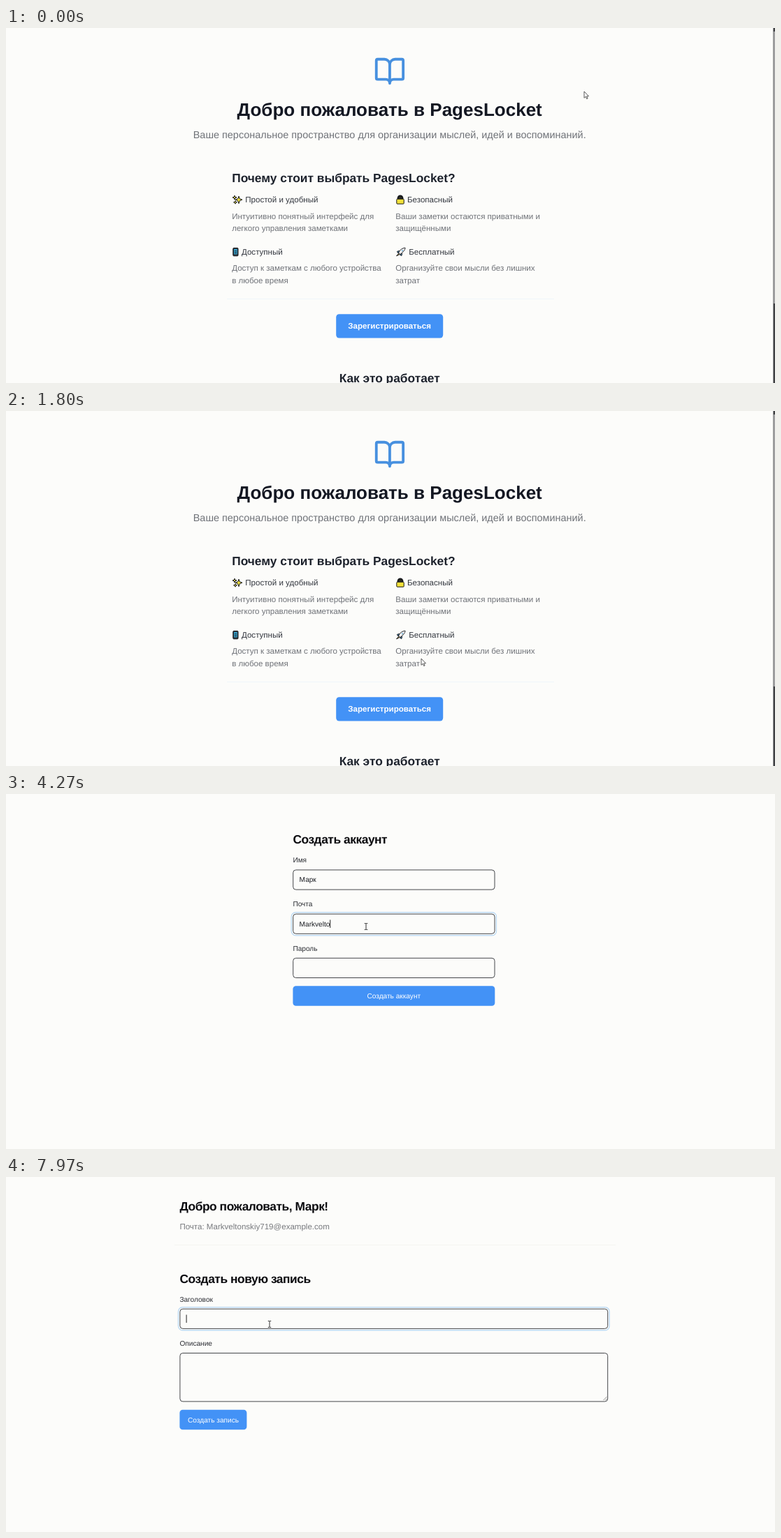
An HTML page for the animation above (8000 ms loop, 1100 by 509 pixels).

```html
<!DOCTYPE html>
<html lang="ru">
<head>
<meta charset="utf-8">
<title>PagesLocket</title>
<style>
  html, body { margin: 0; width: 100%; height: 100%; overflow: hidden; background: #fcfcfa; }
  svg { display: block; width: 1100px; height: 509px; }
  text { font-family: "Liberation Sans", Arial, sans-serif; text-rendering: geometricPrecision; white-space: pre; }
  .field { fill: #fcfcfa; stroke: #45474b; stroke-width: 1; }
  .ring { fill: none; stroke: #bcdaf3; stroke-width: 1.4; }
  .ink { stroke: #16181c; stroke-linejoin: round; }
</style>
</head>
<body>
<svg id="stage" viewBox="0 0 1100 509"></svg>
<script>
const LOOP = 8000, MAX_SCROLL = 157, MID = 548.7;
const H1 = 26.02, H2 = 17.34, LEAD = 14.45, BODY = 11.56, SMALL = 10.12;
const BLUE = '#4392f6', HOVER = '#2473f8';
const BRAND = 'PagesLocket', USER = 'Марк', MAIL = 'Markveltonskiy719@example.com';
const T_FORM = 2640, T_NOTES = 7240;

// Text placed by the middle of its capitals.
function text(x, cy, size, str, o = {}) {
  const { fill = '#6f7278', bold, anchor = 'start', track = 0, id } = o;
  return `<text ${id ? `id="${id}"` : ''} x="${x}" y="${cy + size * 0.35}" font-size="${size}" fill="${fill}"
    text-anchor="${anchor}" font-weight="${bold ? 700 : 400}" letter-spacing="${track}">${str}</text>`;
}
const mid = (x, cy, size, str, o) => text(x, cy, size, str, { ...o, anchor: 'middle' });
const title = (x, cy, str) => text(x, cy, H2, str, { bold: true, fill: '#0b0b0f', track: -0.025 * H2 });
const label = (x, cy, str) => text(x, cy, SMALL, str, { fill: '#2b2d33' });
const box = (x, y, w, h, attrs) => `<rect x="${x}" y="${y}" width="${w}" height="${h}" ${attrs}/>`;
const field = (x, y, w, h) => box(x, y, w, h, 'rx="4" class="field"');
const button = (id, x, y, w, h) => box(x, y, w, h, `id="${id}" rx="4.3" fill="${BLUE}"`);
const group = (id, body) => `<g id="${id}">${body}</g>`;
const at = (x, y, body) => `<g transform="translate(${x} ${y})">${body}</g>`;

const sparkles = `<path class="ink" fill="#f2e23c" d="M2-5 3.4-1.2 7 0 3.4 1.4 2 5.5.6 1.4-3 0 .6-1.2Z
  M-4-6-3.2-4-1-3.2-3.2-2.4-4 0-4.8-2.4-7-3.2-4.8-4Z M-3 1.5-2.3 3-.6 3.7-2.3 4.4-3 6-3.7 4.4-5.4 3.7-3.7 3Z"/>`;
const lock = `<path class="ink" fill="#2b2b22" stroke-width="2" d="M-3.4 0V-2.4a3.4 3.4 0 0 1 6.8 0V0"/>
  <rect class="ink" x="-5.2" y="-1" width="10.4" height="7" rx="1" fill="#f3e13a"/>`;
const phone = `<rect class="ink" x="-3.6" y="-5.6" width="7.2" height="11.4" rx="1" fill="#2a3036"/>
  <rect x="-2.4" y="-4" width="4.8" height="7.4" fill="#35a3cf"/><path stroke="#16181c" d="M-1.6-1.2H1.6M-1.6 1.4H1.6"/>`;
const rocket = `<path class="ink" fill="#4fa9df" d="M-2.2-1.6-5.6-.6-4 2Z M1.6 2.2.8 5.6-1.8 4Z"/>
  <path class="ink" fill="#f2f2f2" d="M6-5.8C2-5.6-1.8-2.8-3.4 1.2L-1 3.6C3-.2 6-2.4 6-5.8Z"/>
  <circle cx="2" cy="-1.8" r="1.1" fill="#7fb9dd"/><path class="ink" fill="#f0c040" d="M-3.4 2.4-6.4 5.8-2.6 4Z"/>`;

function feature(x, y, icon, iconX, titleX, head, lines) {
  return at(iconX, y, icon) + text(titleX, y, BODY, head, { fill: '#33373f' }) +
    lines.map((s, i) => text(x, y + 23.3 + i * 17.3, BODY, s)).join('');
}
function step(x, n, head, note) {
  return `<circle cx="${x}" cy="559.5" r="23.1" fill="${BLUE}"/>` +
    mid(x, 559.5, H2, n, { fill: '#fff' }) +
    mid(x, 602.8, BODY, head, { fill: '#33373f' }) + mid(x, 625.8, BODY, note);
}

const book = `<path transform="translate(525.9 39) scale(1.92)" fill="none" stroke="#4790df" stroke-width="2"
  stroke-linecap="round" stroke-linejoin="round" d="M12 7v14M3 18a1 1 0 0 1-1-1V4a1 1 0 0 1 1-1h5a4 4 0 0 1 4 4
  4 4 0 0 1 4-4h5a1 1 0 0 1 1 1v13a1 1 0 0 1-1 1h-6a3 3 0 0 0-3 3 3 3 0 0 0-3-3z"/>`;

const landing = group('content', book +
  mid(MID, 117, H1, `Добро пожаловать в ${BRAND}`, { bold: true, fill: '#131722' }) +
  mid(MID, 153, LEAD, 'Ваше персональное пространство для организации мыслей, идей и воспоминаний.') +
  text(323.2, 214.6, H2, `Почему стоит выбрать ${BRAND}?`, { bold: true, fill: '#1d222c' }) +
  feature(323.2, 246.2, sparkles, 331, 342.3, 'Простой и удобный', ['Интуитивно понятный интерфейс для', 'легкого управления заметками']) +
  feature(557.3, 246.2, lock, 564, 574, 'Безопасный', ['Ваши заметки остаются приватными и', 'защищёнными']) +
  feature(323.2, 321, phone, 328.4, 337, 'Доступный', ['Доступ к заметкам с любого устройства', 'в любое время']) +
  feature(557.3, 321, rocket, 565, 576.2, 'Бесплатный', ['Организуйте свои мысли без лишних', 'затрат']) +
  box(316, 388, 468, 1, 'fill="#eff6f9"') +
  button('signup', 472.2, 410.2, 153, 34.2) +
  mid(MID, 427.3, BODY, 'Зарегистрироваться', { bold: true, fill: '#fff' }) +
  mid(MID, 501.6, H2, 'Как это работает', { bold: true, fill: '#1d222c' }) +
  step(183, 1, 'Зарегистрируйтесь', 'Создайте бесплатный аккаунт за несколько секунд') +
  step(MID, 2, 'Создавайте заметки', 'Добавляйте свои мысли и идеи') +
  step(914.4, 3, 'Организуйте', 'Держите ваши заметки в порядке и всегда под рукой')) +
  box(1097.4, 0, 2.6, 509, 'fill="#404144"') + box(1097.4, 5, 2.6, 390, 'id="thumb" fill="#9f9fa1"');

const FIELD_Y = [108.9, 172.1, 235.3];
const form = title(410.4, 65.3, 'Создать аккаунт') +
  ['Имя', 'Почта', 'Пароль'].map((s, i) =>
    label(410.4, FIELD_Y[i] - 14.2, s) + field(410.7, FIELD_Y[i], 288.3, 28.2) +
    text(419.6, FIELD_Y[i] + 14, SMALL, '', { id: 'in' + i, fill: '#1c1e24' })).join('') +
  box(408.3, 0, 293.1, 33, 'id="ring" rx="6" class="ring"') +
  box(0, 0, 1, 11.5, 'id="caret" fill="#222"') +
  button('submit', 410.4, 275.2, 288.9, 28.6) +
  mid(554.8, 289.4, SMALL, 'Создать аккаунт', { fill: '#fff' });

const notes = title(248.4, 42.4, `Добро пожаловать, ${USER}!`) +
  text(248.4, 71.2, BODY, `Почта: ${MAIL}`, { fill: '#77797d' }) +
  box(241, 97, 631, 1, 'fill="#f4f5f1"') +
  title(248.4, 145.8, 'Создать новую запись') +
  label(248.4, 175, 'Заголовок') + field(248.9, 189.2, 611.8, 28.2) +
  `<g id="noteFocus">${box(246.5, 186.8, 616.6, 33, 'rx="6" class="ring"')}${box(257.6, 197.5, 1, 11.5, 'fill="#222"')}</g>` +
  label(248.4, 238.3, 'Описание') + field(248.9, 252.5, 611.8, 69.4) +
  '<path d="M854.5 320 859.5 315M857.3 320.3 859.8 317.8" stroke="#777" stroke-width=".8"/>' +
  button('save', 248.4, 333.8, 96, 28.4) +
  mid(296.5, 348, SMALL, 'Создать запись', { fill: '#fff' });

const cursors =
  group('arrow', '<path d="M0 0V9.3L2.2 7.3 3.7 10.6 5.1 10 3.7 6.8H6.5Z" fill="#fff" stroke="#333" stroke-width=".8" stroke-linejoin="round"/>') +
  group('beam', '<path d="M-2.2-4.5H-.6L0-4 .6-4.5H2.2M0-4V4M-2.2 4.5H-.6L0 4 .6 4.5H2.2" fill="none" stroke="#333" stroke-width="1"/>') +
  group('hand', `<path d="M-.9.8C-.9-.5.9-.5.9.8V4.2L5 5.1Q6 5.4 6 6.5L5.3 9.3V11.3H-.4V10L-3.3 6.6
    C-3.8 5.6-2.7 4.9-2 5.6L-.9 6.7Z" fill="#fff" stroke="#333" stroke-width=".8" stroke-linejoin="round"/>`);

const stage = document.getElementById('stage');
stage.innerHTML = group('landing', landing) + group('form', form) + group('notes', notes) + group('mouse', cursors);
const el = id => document.getElementById(id);
const show = (id, on) => el(id).style.display = on ? '' : 'none';
const move = (id, x, y) => el(id).setAttribute('transform', `translate(${x} ${y})`);

// Keys are [time, ...values]; each stretch eases in and out.
function sample(keys, t) {
  const i = keys.findIndex(k => k[0] > t);
  if (i < 0) return keys[keys.length - 1].slice(1);
  const a = keys[i - 1], b = keys[i], u = (t - a[0]) / (b[0] - a[0]), e = u * u * (3 - 2 * u);
  return a.slice(1).map((v, j) => v + (b[j + 1] - v) * e);
}
const SCROLL = [[0, 0], [60, 0], [660, MAX_SCROLL], [1200, MAX_SCROLL], [1740, 0]];
const MOUSE = [[0, 827, 91], [1460, 827, 91], [1800, 594, 355], [2300, 536, 424], [2660, 536, 424],
  [2950, 533, 132], [3700, 533, 132], [3900, 515, 190], [4960, 515, 190], [5230, 488, 260],
  [6420, 488, 260], [6680, 485, 290], [7260, 485, 290], [7680, 377, 211]];
// Text, focus time, first key, key interval.
const INPUTS = [[USER, 2950, 3230, 110], [MAIL, 3910, 4020, 30], ['•'.repeat(9), 5240, 5340, 105]];
const BLUR = 6860, NOTE_FOCUS = 7700;

const inside = (x, y, [l, t, r, b]) => x >= l && x <= r && y >= t && y <= b;

function pointer(t, x, y) {
  if (t < T_FORM) return inside(x, y, [472, 410, 625, 444]) ? 'hand' : 'arrow';
  if (t < T_NOTES) {
    if (inside(x, y, [410, 275, 699, 304])) return 'hand';
    return FIELD_Y.some(f => inside(x, y, [410, f, 699, f + 28.5])) ? 'beam' : 'arrow';
  }
  return inside(x, y, [248, 189, 861, 217.5]) || inside(x, y, [248, 252, 861, 322]) ? 'beam' : 'arrow';
}

function drawForm(t) {
  let focus = -1;
  INPUTS.forEach(([str, at, start, gap], i) => {
    if (t >= at && t < BLUR) focus = i;
    const n = t < start ? 0 : Math.floor((t - start) / gap) + 1;
    el('in' + i).textContent = str.slice(0, n);
  });
  show('ring', focus >= 0);
  show('caret', focus >= 0);
  if (focus < 0) return;
  el('ring').setAttribute('y', FIELD_Y[focus] - 2.4);
  el('caret').setAttribute('x', 419.4 + el('in' + focus).getComputedTextLength());
  el('caret').setAttribute('y', FIELD_Y[focus] + 8.3);
}

function draw(t) {
  const [scroll] = sample(SCROLL, t), [x, y] = sample(MOUSE, t);
  const shape = pointer(t, x, y);
  show('landing', t < T_FORM);
  show('form', t >= T_FORM && t < T_NOTES);
  show('notes', t >= T_NOTES);
  move('content', 0, -scroll);
  move('thumb', 0, scroll * 0.735);
  drawForm(t);
  show('noteFocus', t >= NOTE_FOCUS);
  for (const id of ['signup', 'submit']) el(id).setAttribute('fill', shape === 'hand' ? HOVER : BLUE);
  for (const id of ['arrow', 'beam', 'hand']) show(id, id === shape);
  move('mouse', x, y);
}

function tick() {
  draw(performance.now() % LOOP);
  requestAnimationFrame(tick);
}
tick();
</script>
</body>
</html>
```
